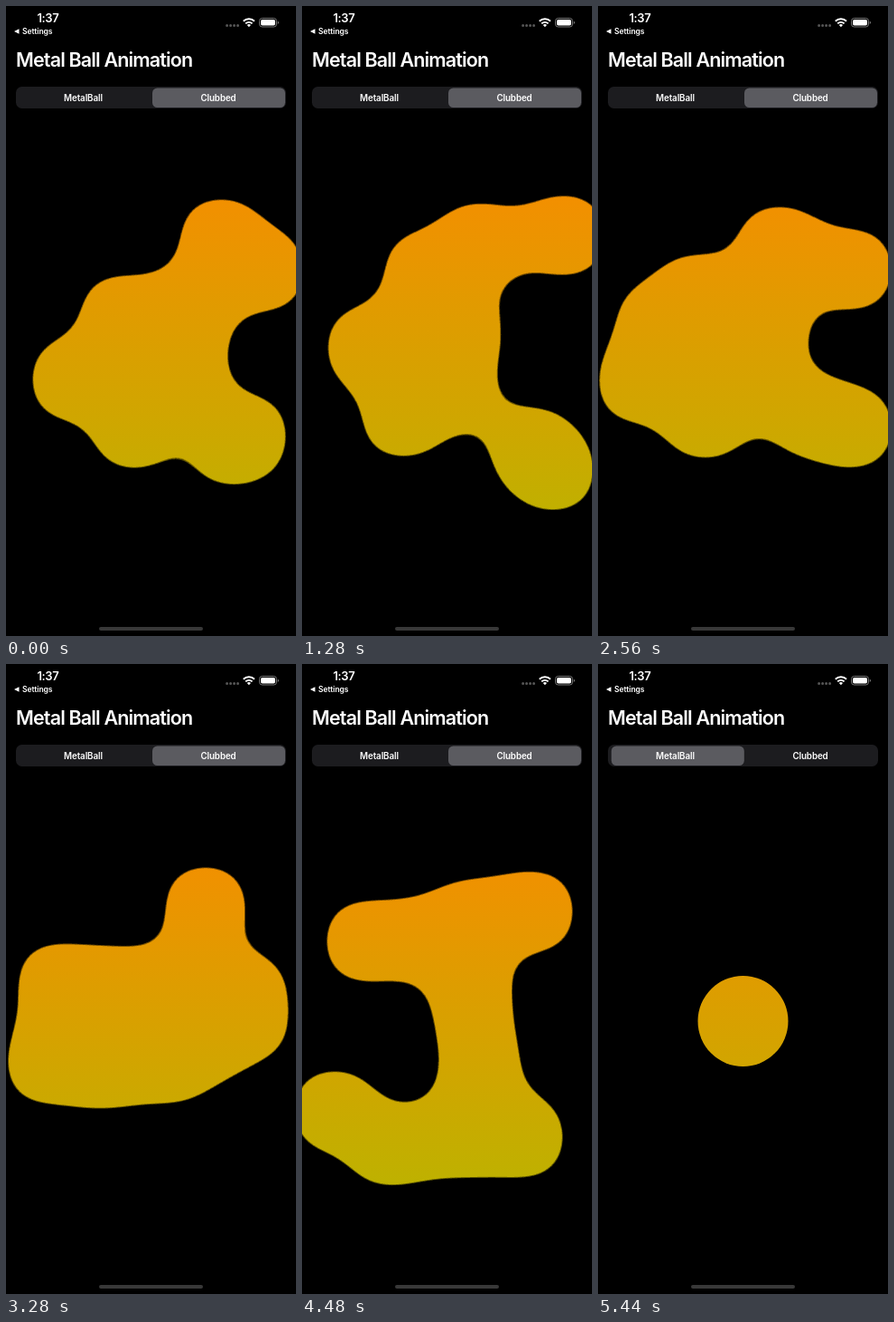
Write an HTML page that moves like this. It is 321x695 px and loops after 5520 ms.

```html
<!DOCTYPE html>
<html lang="en">
<head>
<meta charset="utf-8">
<title>Metal Ball Animation</title>
<style>
  html, body { margin: 0; width: 100%; height: 100%; overflow: hidden; background: #000; }
  svg { display: block; font-family: Inter, Roboto, sans-serif; font-weight: 600; fill: #fff; }
</style>
</head>
<body>
<svg width="321" height="695" viewBox="0 0 321 695">
  <defs>
    <linearGradient id="gold" gradientUnits="userSpaceOnUse" x1="0" y1="130" x2="0" y2="680">
      <stop stop-color="rgb(254,136,0)"/>
      <stop offset="1" stop-color="rgb(175,187,0)"/>
    </linearGradient>
    <!-- blur, then cut at half alpha, so neighbouring shapes flow together -->
    <filter id="goo" filterUnits="userSpaceOnUse" x="-150" y="0" width="621" height="800"
            color-interpolation-filters="sRGB">
      <feGaussianBlur stdDeviation="22.5"/>
      <feComponentTransfer><feFuncA type="linear" slope="30" intercept="-14.5"/></feComponentTransfer>
    </filter>
    <mask id="blob" maskUnits="userSpaceOnUse" x="0" y="0" width="321" height="695">
      <g id="balls" filter="url(#goo)"/>
    </mask>
  </defs>
  <rect id="club" width="321" height="695" fill="url(#gold)" mask="url(#blob)"/>
  <circle id="ball" cx="160.5" cy="394" r="50" fill="url(#gold)"/>

  <!-- status bar -->
  <text x="34.5" y="18" font-size="13" letter-spacing="-.4">1:37</text>
  <path d="M9 28l5.5-2.8v5.6z"/>
  <text x="18" y="31" font-size="8.6" letter-spacing="-.1">Settings</text>
  <path d="M244.6 21.5h12.1" stroke="#555" stroke-width="3" stroke-linecap="round" stroke-dasharray="0 4"/>
  <path d="M262.8 16.8a8.7 8.7 0 0 1 12.2 0M265.2 19.4a5.3 5.3 0 0 1 7.4 0"
        fill="none" stroke="#fff" stroke-width="2"/>
  <path d="M268.9 23.2l-2.1-2.2a3 3 0 0 1 4.2 0z"/>
  <rect x="280.5" y="13.5" width="19" height="9.5" rx="3" fill="none" stroke="#777"/>
  <rect x="282" y="15" width="16" height="6.5" rx="1.8"/>
  <path d="M300.8 16.7v3.2q1.2-.4 1.2-1.6t-1.2-1.6z" fill="#777"/>

  <text x="11" y="67" font-size="21.5" letter-spacing="-.85">Metal Ball Animation</text>

  <!-- segmented control -->
  <rect x="11" y="89" width="299" height="24" rx="6.5" fill="#1c1c1f"/>
  <rect id="knob" y="90.5" width="147" height="21.5" rx="5.5" fill="#5b5b60"/>
  <g font-size="9.8" letter-spacing="-.1" text-anchor="middle">
    <text x="85.5" y="104.6">MetalBall</text>
    <text x="235" y="104.6">Clubbed</text>
  </g>
  <rect x="103" y="685" width="115" height="4" rx="2" fill="#383838"/>
</svg>
<script>
const LOOP = 5520, STEP = 80, SWITCH = 5200, SIDE = 90, COAST = 400;
const TIMES = [0, 1920, 3280, 4480], LAST = TIMES.length - 1;
const el = id => document.getElementById(id);
const balls = [];

// A rounded square drifting through one stop per entry in TIMES.
function addBall(...stops) {
  const node = document.createElementNS('http://www.w3.org/2000/svg', 'rect');
  const attrs = { x: -SIDE / 2, y: -SIDE / 2, width: SIDE, height: SIDE, rx: 24, fill: '#fff' };
  for (const name in attrs) node.setAttribute(name, attrs[name]);
  el('balls').append(node);
  balls.push({ node, xs: stops.map(s => s[0]), ys: stops.map(s => s[1]) });
}

addBall([238, 257], [185, 264], [221, 268], [190, 282]);
addBall([285, 292], [290, 252], [266, 365], [245, 522]);
addBall([128, 342], [51, 395], [46, 440], [36, 493]);
addBall([73, 412], [124, 466], [105, 446], [97, 531]);
addBall([142, 466], [178, 410], [180, 440], [175, 522]);
addBall([250, 484], [287, 509], [268, 392], [256, 273]);
addBall([205, 335], [112, 287], [120, 356], [135, 303]);
addBall([200, 415], [85, 350], [58, 353], [71, 306]);
addBall([160, 385], [183, 350], [190, 358], [188, 370]);
addBall([266, 474], [246, 484], [222, 415], [197, 445]);

function speed(v, k) {
  const a = Math.max(k - 1, 0), b = Math.min(k + 1, LAST);
  return (v[b] - v[a]) / (TIMES[b] - TIMES[a]);
}

// Smooth curve through the stops, coasting to rest after the last one.
function along(v, t) {
  const extra = t - TIMES[LAST];
  if (extra > 0) return v[LAST] + speed(v, LAST) * COAST * (1 - Math.exp(-extra / COAST));
  let k = 0;
  while (k < LAST - 1 && t >= TIMES[k + 1]) k++;
  const span = TIMES[k + 1] - TIMES[k], u = (t - TIMES[k]) / span, w = 1 - u;
  return v[k] * w * w * (1 + 2 * u) + v[k + 1] * u * u * (3 - 2 * u) +
    span * u * w * (w * speed(v, k) - u * speed(v, k + 1));
}

function draw(now) {
  const t = Math.floor(now % LOOP / STEP) * STEP;
  const clubbed = t < SWITCH;
  el('club').setAttribute('visibility', clubbed ? 'visible' : 'hidden');
  el('ball').setAttribute('visibility', clubbed ? 'hidden' : 'visible');
  for (const { node, xs, ys } of balls)
    node.setAttribute('transform', `translate(${along(xs, t)} ${along(ys, t)})`);
  const slide = Math.min(Math.max((t - 5160) / 373, 0), 1);
  el('knob').setAttribute('x', 12.5 + 149.5 * (1 - slide) ** 3);
}

const start = performance.now();
function tick() {
  draw(performance.now() - start);
  requestAnimationFrame(tick);
}
tick();
</script>
</body>
</html>
```
